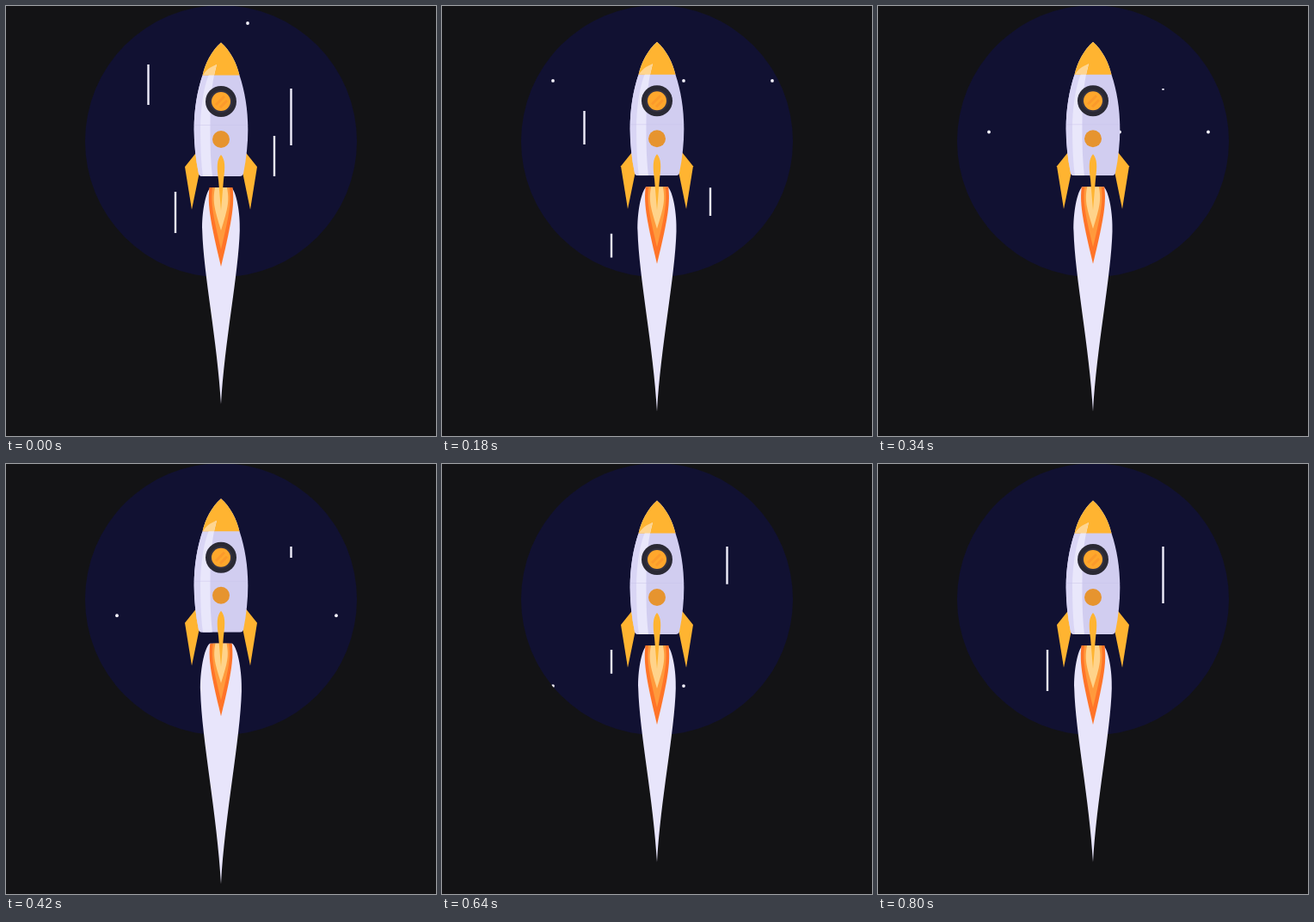
Animation, 500 px wide and 500 px high, one loop 820 ms. Source, as an HTML page:

```html
<!DOCTYPE html>
<html lang="en">
<head>
<meta charset="utf-8">
<title>Rocket</title>
<style>
  html, body { margin: 0; width: 100%; height: 100%; overflow: hidden; background: #131315; }
  svg { display: block; width: 100vw; height: 100vh; }
</style>
</head>
<body>
<svg viewBox="0 0 500 500">
  <defs>
    <clipPath id="sky"><circle cx="250" cy="157.300" r="158"/></clipPath>
    <clipPath id="hull"><path d="M250 42.500C239 52 231.500 67 228.500 80.500C218 112 215 150 224 195Q225 198 228 198H272Q275 198 276 195C285 150 282 112 271.500 80.500C268.500 67 261 52 250 42.500Z"/></clipPath>
  </defs>

  <g clip-path="url(#sky)">
    <rect width="500" height="320" fill="#111132"/>
    <g id="stars" fill="#f4f2fd">
      <circle cx="129" r="1.9"/><circle cx="281" r="1.9"/><circle cx="384" r="1.9"/>
    </g>
    <path id="streaks" stroke="#f0eefb" stroke-width="2.4"/>
  </g>

  <path id="trail" fill="#e8e5fb" d="M-12 0C-18 5 -22.500 30 -21.800 50C-20.500 100 -4 180 0 252C4 180 20.500 100 21.800 50C22.500 30 18 5 12 0Z"/>
  <g id="flame">
    <path fill="#ff7428" d="M-13.500 0C-15.500 18 -14 34 0 92C14 34 15.500 18 13.500 0Z"/>
    <path fill="#ff9a3c" d="M-10 0C-12 18 -10 30 0 72C10 30 12 18 10 0Z"/>
    <path fill="#ffd38a" d="M-7 0C-10 16 -8 24 0 50C8 24 10 16 7 0Z"/>
  </g>

  <g id="rocket">
    <g fill="#ffb431">
      <path d="M222 169.500L208 187L216 236.800L225 193Z"/>
      <path d="M278 169.500L292 187L284 236.800L275 193Z"/>
    </g>
    <g clip-path="url(#hull)">
      <rect x="210" y="40" width="80" height="160" fill="#d1cdf0"/>
      <path fill="#d9d5f5" d="M210 81H238V198H210Z"/>
      <path fill="#ffb431" d="M210 40H290V80.500H210Z"/>
      <path fill="#e9e7fb" d="M245 68C234 73 227 105 226 140C226 165 227 185 229 198H240C236 160 236 110 242 80.500Z"/>
      <path fill="#ffd590" d="M245 68C237 71 232 75 229 80.500H242Q243 74 245 68Z"/>
      <path stroke="#c9c5e8" stroke-width=".5" d="M215 138.500H285"/>
    </g>
    <circle cx="250" cy="111" r="18" fill="#2a2934"/>
    <circle cx="250" cy="111" r="13" fill="#353342"/>
    <circle cx="250" cy="111" r="11" fill="#ffa72c"/>
    <path stroke="#fb9a2b" stroke-width="3" d="M244 115L254 105M249 118L257 110"/>
    <circle cx="250" cy="155" r="10" fill="#e6942f"/>
    <path fill="#ffb431" d="M250 173C245 179 245 187 247 202L250 238L253 202C255 187 255 179 250 173Z"/>
  </g>
</svg>
<script>
  const FRAME = 20, LOOP = 820, PULSE = 160, LENGTH = 93;
  const el = id => document.getElementById(id);
  const place = (id, x, y, sx = 1, sy = 1) =>
    el(id).setAttribute('transform', `translate(${x} ${y}) scale(${sx} ${sy})`);

  // Each streak's tail and head offsets along its fixed track.
  const drift = speed => t => [speed * t, 47 + speed * t];
  const grow = (start, full, end) => t => t < end
    ? [LENGTH * (t / end) ** 1.4, full + (LENGTH - full) * t / end]
    : [0, full * (t - start) / (800 - start)];

  const streaks = [
    { x: 165.5, y: 68, span: drift(0.3) },
    { x: 312, y: 151, span: drift(0.335) },
    { x: 197, y: 216, span: grow(420, 48, 285) },
    { x: 331.5, y: 96, span: grow(327, 66, 180) }
  ];

  function streakPath(t) {
    return streaks.map(({ x, y, span }) => {
      const [tail, head] = span(t).map(v => Math.min(v, LENGTH));
      return head > tail ? `M${x} ${y + tail}V${y + head}` : '';
    }).join('');
  }

  function draw(now) {
    const t = Math.floor(now % LOOP / FRAME) * FRAME;
    const k = 1 - Math.abs(t % PULSE / (PULSE / 2) - 1);
    const lift = -3 * k;
    place('stars', 0, 20 + 0.372 * t);
    el('streaks').setAttribute('d', streakPath(t));
    place('rocket', 0, lift);
    place('trail', 250, 211 + lift, 1 + 0.13 * k, 1 + 0.147 * k);
    place('flame', 250, 211 + lift, 1 - 0.08 * k, 1 - 0.11 * k);
    requestAnimationFrame(draw);
  }
  draw(0);
</script>
</body>
</html>
```
